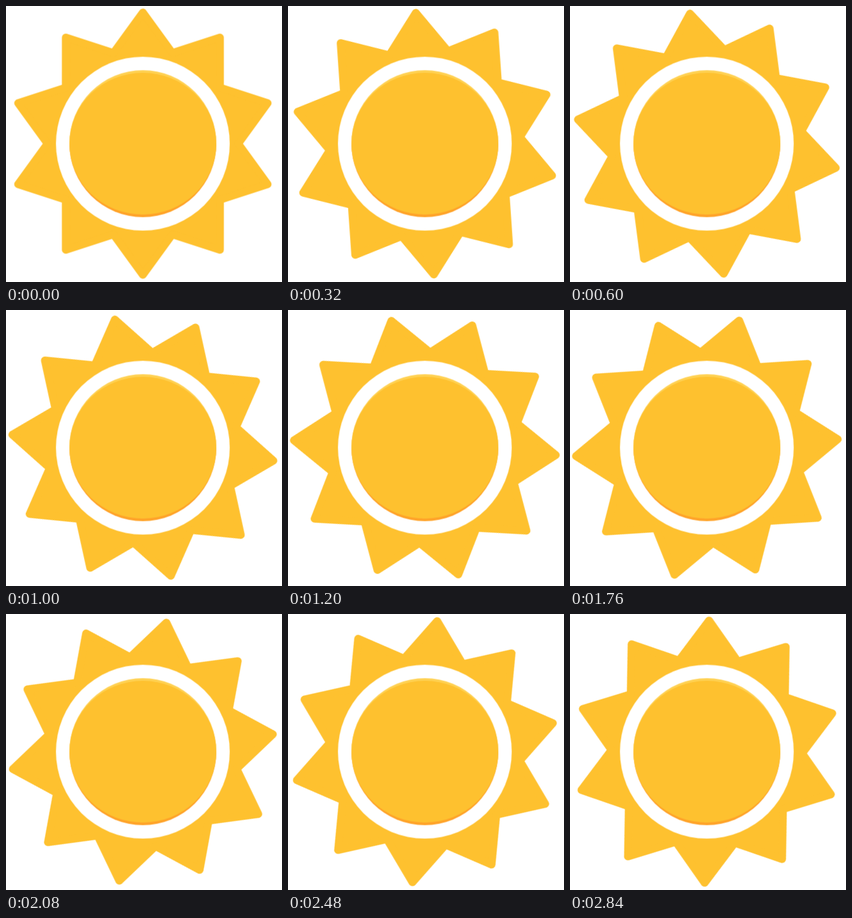
An HTML page for the animation above (2.88 s loop, 432 by 432 pixels).

```html
<!DOCTYPE html>
<html lang="en">
<head>
<meta charset="utf-8">
<title>Sun</title>
<style>
  html, body { margin: 0; width: 100%; height: 100%; overflow: hidden; background: #fff; }
  svg { display: block; width: 100%; height: 100%; }
  #rays {
    fill: #fec12f;
    stroke: #fec12f;
    stroke-width: 12;
    stroke-linejoin: round;
    animation: spin 2880ms steps(72) infinite;
  }
  /* The turn stops one step short of a full ray, then wraps. */
  @keyframes spin {
    to { transform: rotate(calc(-36deg * 72 / 73)); }
  }
</style>
</head>
<body>
<svg viewBox="0 0 432 432">
  <g transform="translate(214.2 215.5)">
    <polygon id="rays"/>
    <circle r="136" fill="#fff"/>
    <path d="M-115 0A115 115 0 0 1 115 0Z" fill="#ffd152"/>
    <path d="M-115 0A115 115 0 0 0 115 0Z" fill="#ffa329"/>
    <ellipse rx="115" ry="111" fill="#fec12f"/>
  </g>
</svg>
<script>
  const RAYS = 10, TIP = 205.4, NOTCH = 149.3;
  const points = Array.from({ length: RAYS * 2 }, (_, i) => {
    const angle = i * Math.PI / RAYS;
    const radius = i % 2 ? NOTCH : TIP;
    return [radius * Math.sin(angle), -radius * Math.cos(angle)];
  });
  document.getElementById('rays').setAttribute('points', points.join(' '));
</script>
</body>
</html>
```
